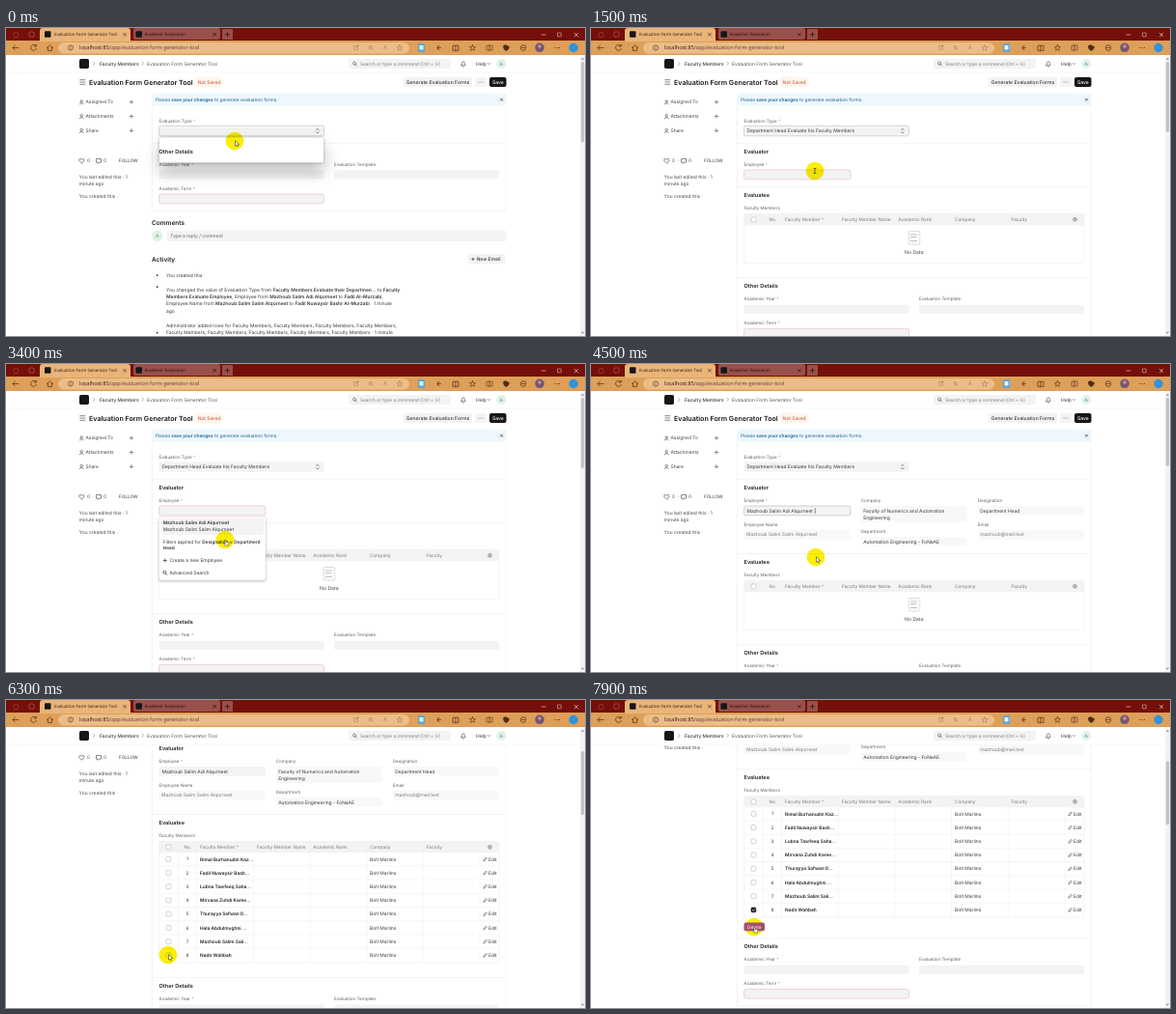
An HTML page for the animation above (8 s loop, 600x319 px).

```html
<!DOCTYPE html>
<html lang="en">
<head>
<meta charset="utf-8">
<title>Evaluation form</title>
<style>
html, body { margin: 0; width: 100%; height: 100%; overflow: hidden; background: #fff; }
svg { display: block; width: 600px; height: 319px; }
text { font-family: Inter, sans-serif; text-rendering: geometricPrecision; white-space: pre; }
.chrome text { font-family: "Open Sans", sans-serif; }
.floating { filter: drop-shadow(0 1px 1px rgba(0, 0, 0, .25)); }
.raised { filter: drop-shadow(0 0 1px rgba(0, 0, 0, .4)) drop-shadow(0 9px 8px rgba(0, 0, 0, .25)); }
</style>
</head>
<body>
<svg id="stage" viewBox="0 0 600 319" xmlns="http://www.w3.org/2000/svg"></svg>
<script>
const LOOP = 8000, STEP = 100;
const INK = '#383838', MUTED = '#7c7c7c', FILL = '#f3f3f3', LINE = '#ededed', RED = '#e8b9b9', STAR = '#e08585';
const stage = document.getElementById('stage');

const person = 'Mazhoub Salim Adi Alqurneet';
const fullName = 'Mazhoub Salim Salim Alqurneet';
const choice = 'Department Head Evaluate his Faculty Members';
const members = ['Rimal Burhanudin Kaz...', 'Fadil Nuwaysir Bash...', 'Lubna Tawfeeq Saha...',
  'Mirvana Zuhdi Karee...', 'Thurayya Safwan D...', 'Hala Abdulmughni ...',
  'Mazhoub Salim Sali...', 'Nadir Wahbah'];

// Drawing helpers; text is placed by its vertical middle.
const bold = s => `<tspan font-weight="600">${s}</tspan>`;
const text = (x, y, s, o = {}) => {
  const size = o.size || 4.9;
  return `<text x="${x}" y="${y + size * .36}" font-size="${size}" font-weight="${o.weight || 400}" ` +
    `fill="${o.fill || INK}" text-anchor="${o.anchor || 'start'}">${s}</text>`;
};
const rect = (x, y, w, h, fill, r = 0, stroke = 'none') =>
  `<rect x="${x}" y="${y}" width="${w}" height="${h}" rx="${r}" fill="${fill}" stroke="${stroke}" stroke-width=".6"/>`;
const circle = (x, y, r, fill, stroke = 'none') =>
  `<circle cx="${x}" cy="${y}" r="${r}" fill="${fill}" stroke="${stroke}" stroke-width=".7"/>`;
const path = (d, stroke = INK, width = .7, fill = 'none') =>
  `<path d="${d}" fill="${fill}" stroke="${stroke}" stroke-width="${width}" stroke-linecap="round" stroke-linejoin="round"/>`;
const group = (x, y, body) => `<g transform="translate(${x} ${y})">${body}</g>`;
const fade = (opacity, body) => `<g opacity="${opacity}">${body}</g>`;
const label = (x, y, s, required) =>
  text(x, y, s + (required ? ` <tspan fill="${STAR}">*</tspan>` : ''), { size: 4.55, fill: '#626262' });
const heading = (y, s) => text(158.5, y, s, { size: 5.6, weight: 600, fill: '#222' });
const rule = y => path(`M151.5 ${y}H518`, LINE, .6);
const plus = (x, y, c, r = 2) => path(`M${x - r} ${y}h${2 * r}M${x} ${y - r}v${2 * r}`, c, .65);
const cross = (x, y, c, r = 1.4) => path(`M${x - r} ${y - r}l${2 * r} ${2 * r}m0 ${-2 * r}l${-2 * r} ${2 * r}`, c, .7);
const lens = (x, y, c) => circle(x - .4, y - .4, 1.5, 'none', c) + path(`M${x + .8} ${y + .8}l1.3 1.3`, c);
const star = (x, y, c) => path(`M${x} ${y - 3}l.9 2 2.1.2-1.6 1.4.5 2.1-1.9-1.1-1.9 1.1.5-2.1-1.6-1.4 2.1-.2z`, c, .6);

function browser() {
  const c = '#4a2c17', pale = '#a8804f', light = '#e9c5b8', dark = '#260c09', bar = '#dd9f59', tab = '#97504c';
  let s = rect(0, 0, 600, 14, '#740f09') + rect(0, 13, 600, 15, bar);
  s += path('M35 14V3q0-3 3-3H126q3 0 3 3V14z', 'none', 0, '#e9b478');
  s += rect(132, 0, 90, 12, tab, 2) + rect(224, 1, 11, 11, tab, 1);
  s += rect(8, 4.5, 4.5, 5, 'none', 1, '#b44840') + rect(24, 4, 5, 5, 'none', 1, '#c4685c');
  s += rect(40, 3.3, 6.5, 6.5, '#171717', 1) + rect(134.5, 3.3, 6.5, 6.5, '#171717', 1);
  s += text(50, 6.5, 'Evaluation Form Generator Tool', { size: 4.4, fill: '#2b1712' });
  s += text(143.5, 6.5, 'Academic Evaluation', { size: 4.4, fill: dark });
  s += cross(123, 6.7, c) + cross(216, 6.7, dark) + plus(229.5, 6.7, dark);
  s += path('M555 7h4', light) + rect(571.5, 5, 3.8, 3.8, 'none', .4, light) + cross(591, 7, light, 1.8);
  s += path('M13 20.5H7m2.4-2.5L7 20.5 9.4 23', c);
  s += path('M31 18.6a3 3 0 1 0 .4 2.8M31.2 17v2h-2', c);
  s += path('M42.5 20.5l3-2.7 3 2.7M43.4 20v3.4h4.2V20', c);
  s += rect(54, 15, 364, 11.5, '#ebbd88', 5.7);
  s += circle(67, 20.5, 2.6, 'none', '#5f4129') + path('M67 20.2v1.5m0-2.8v.1', '#5f4129', .6);
  s += text(76, 20.4, 'localhost:85<tspan fill="#5f4129">/app/evaluation-form-generator-tool</tspan>', { size: 5.5, fill: '#2a1a14' });
  s += rect(360.5, 18.3, 4, 4.2, 'none', .6, pale) + path('M363 20l2.6-2.6', pale) + lens(378, 20.3, pale);
  s += text(391, 20.3, 'A', { size: 5.8, fill: pale }) + star(408, 20.5, pale);
  s += rect(427, 16.3, 7, 8.4, '#4ba7e6', 1.5) + rect(428.5, 18, 4, 4.6, '#e8f4fc', .4);
  s += path('M449 18.5q-2 0-2 2t2 2m-1.5-2h3', c);
  s += path('M466 18.5v5q-2-1-3 0v-5q2-1 3 0q1-1 3 0v5q-1-1-3 0', c);
  s += star(483.5, 20.5, c) + rect(498, 18, 6, 5, 'none', 1, c) + path('M501 18v5', c);
  s += path('M518.5 18q-3.5-1-3 2t3 3.6q2.7-1.3 2.9-3.8z', c, .7, c) + circle(536, 20.5, 2.8, 'none', c) + path('M534.5 20.5h3', c);
  s += circle(553, 20.3, 4.8, '#755878') + circle(553, 19, 1.7, '#c59a87');
  s += [569, 571.2, 573.4].map(x => circle(x, 20.5, .6, c)).join('') + circle(588, 20.5, 4.7, '#2f93dc');
  return `<g class="chrome">${s}</g>`;
}

function navbar() {
  const chevron = x => path(`M${x} 35.2l1.6 1.7-1.6 1.7`, '#888', .6);
  return rect(0, 28, 595, 18, '#fff') + path('M0 46H595', '#f1f1f1', .6) + rect(76, 32, 10, 10, '#171717', 1.7) +
    chevron(90.5) + text(97, 37, 'Faculty Members', { size: 4.9, weight: 500 }) +
    chevron(141) + text(146, 37, 'Evaluation Form Generator Tool', { fill: '#555' }) +
    rect(355, 32, 106, 10, FILL, 2) + lens(361.5, 37, '#555') +
    text(367, 37, 'Search or type a command (Ctrl + G)', { size: 4.75, fill: MUTED }) +
    path('M471.8 38.8h4.4q-.7-.8-.7-2.2 0-1.8-1.5-1.8t-1.5 1.8q0 1.4-.7 2.2zM473.5 40h1', '#444', .6) +
    text(487, 37, 'Help', { size: 5 }) + path('M499.3 36.4l1.3 1.3 1.3-1.3', '#555', .6) +
    circle(513.3, 37, 5, '#dff3e6') + text(513.3, 37, 'A', { anchor: 'middle', fill: '#3a9a63' });
}

function pageHead() {
  let s = [53.7, 56, 58.3].map(y => path(`M76.8 ${y}h5`, '#444', .65)).join('');
  s += text(86, 56, 'Evaluation Form Generator Tool', { size: 7.1, weight: 600, fill: '#171717' });
  s += rect(196, 51, 29, 10, '#fff3ee', 4) + text(198.8, 56, 'Not Saved', { size: 4.85, fill: '#cb4f25' });
  s += rect(412, 51, 71, 10, FILL, 2) + text(447.5, 56, 'Generate Evaluation Forms', { size: 5.1, weight: 500, anchor: 'middle' });
  s += rect(486, 51, 12, 10, FILL, 2) + [490, 492, 494].map(x => circle(x, 56, .45, INK)).join('');
  s += rect(501, 51, 17.5, 10, '#171717', 2) + text(509.8, 56, 'Save', { size: 5, weight: 500, fill: '#fff', anchor: 'middle' });
  ['Assigned To', 'Attachments', 'Share'].forEach((name, i) => {
    const y = [76.7, 91.5, 106.3][i];
    s += circle(78.3, y - .8, 1.2, 'none', '#555') + path(`M76.2 ${y + 2}q2.1-2.6 4.2 0`, '#555');
    s += text(82.5, y, name, { size: 4.9, fill: '#444' }) + plus(130, y, '#555', 1.8);
  });
  s += path('M78.4 140l-2.4-2.4q-.8-1.8.8-2.2 1-.1 1.6 1 .6-1.1 1.6-1 1.6.4.8 2.2z', '#555');
  s += text(84, 137.5, '0  ·', { fill: '#555' }) + path('M94 135.4h4.5v3.8h-2.2l-1.2 1.1v-1.1H94z', '#555') + text(101, 137.5, '0', { fill: '#555' });
  s += text(117, 137.5, 'FOLLOW', { size: 4.7 });
  s += text(75.8, 154.7, 'You last edited this · 1', { fill: '#4a4a4a' }) + text(75.8, 161.7, 'minute ago', { fill: '#4a4a4a' });
  s += text(75.8, 174, 'You created this ·', { fill: '#4a4a4a' });
  s += rect(151.5, 68, 367, 12.5, '#edf7fd', 2);
  s += text(155, 74.2, `Please ${bold('save your changes')} to generate evaluation forms.`, { size: 4.75, fill: '#1f6591' });
  return s + cross(513.5, 74.2, '#333', 1.2);
}

function typeSection(st) {
  return label(158.5, 96, 'Evaluation Type', true) +
    rect(158.5, 101.2, 171, 10.6, FILL, 2, st.selectFocus ? '#bdbdbd' : 'none') +
    text(161.5, 106.5, st.chosen ? choice : '') +
    path('M321.7 105.5l1.2-1.3 1.2 1.3m0 2.2l-1.2 1.3-1.2-1.3', '#444', .6);
}

function evaluator(st) {
  let s = rule(119.3) + heading(127.7, 'Evaluator') + label(158.5, 141, 'Employee', true);
  const edge = st.filled ? (st.fieldFocus ? '#b5b5b5' : 'none') : RED;
  s += rect(158.5, 147, 110.5, 9.8, FILL, 2, edge);
  if (st.filled) s += text(161.5, 152, person);
  if (st.caret) s += path(`M${st.filled ? 232.3 : 161.6} 149.5v5`, '#222', .5);
  if (!st.fetched) return s;
  const value = (x, y, h, lines, fill = INK) => rect(x, y - 4.8, 110, h, '#f8f8f8', 2) +
    lines.map((line, i) => text(x + 2.5, y + i * 7.4, line, { fill })).join('');
  return s + label(158.5, 166.5, 'Employee Name') + value(158.5, 176.6, 9.6, [fullName], MUTED) +
    label(279.7, 141, 'Company') + value(279.7, 151.8, 17, ['Faculty of Numerics and Automation', 'Engineering']) +
    label(279.7, 173.2, 'Department') + value(279.7, 183.8, 9.6, ['Automation Engineering - FoNaAE']) +
    label(400.8, 141, 'Designation') + value(400.8, 151.8, 9.6, ['Department Head']) +
    label(400.8, 166.5, 'Email') + value(400.8, 176.6, 9.6, ['mazhoub@mail.test'], MUTED);
}

const checkbox = (y, on) => rect(166, y - 2.4, 4.9, 4.9, on ? '#171717' : '#fff', 1.1, on ? '#171717' : '#b5b5b5') +
  (on ? path(`M167.3 ${y}l1 1.1 1.6-2`, '#fff', .7) : '');

const PITCH = 14.22, TABLE_END = 39.8 + members.length * PITCH;

// Placed relative to the top edge of the section.
function evaluatee(st) {
  const bottom = st.rows ? TABLE_END : 79;
  const columns = [[201, `Faculty Member <tspan fill="${STAR}">*</tspan>`], [259.7, 'Faculty Member Name'],
    [318.3, 'Academic Rank'], [377, 'Company'], [435.5, 'Faculty']];
  let s = rule(0) + heading(8.7, 'Evaluatee') + label(158.5, 22, 'Faculty Members');
  s += rect(158.5, 28, 352.5, bottom - 28, '#fff', 2, LINE) + rect(158.5, 28, 352.5, 11.8, FILL, 2);
  s += checkbox(33.8) + text(184.5, 33.8, 'No.', { size: 4.7, fill: MUTED });
  s += columns.map(([x, name]) => text(x, 33.8, name, { size: 4.75, fill: MUTED })).join('');
  s += circle(501.5, 33.8, 1.9, 'none', '#777') + circle(501.5, 33.8, .7, 'none', '#777');
  if (!st.rows) {
    return s + rect(329.2, 46, 11.6, 13.6, '#fafafa', 1, '#c9c9c9') +
      path('M331.5 49.5h2m1 0h3m-6 2.5h2m1 0h2m-5 4h6', '#999', .6) +
      text(334.8, 67.8, 'No Data', { size: 5.1, fill: '#444', anchor: 'middle' });
  }
  s += [178.5, 197.5, 256.5, 315, 373.7, 432.3, 491].map(x => path(`M${x} 28V${bottom}`, LINE, .5)).join('');
  members.forEach((name, i) => {
    const y = 46.3 + i * PITCH;
    if (i) s += path(`M158.5 ${y - PITCH / 2}H511`, LINE, .5);
    s += checkbox(y, st.checked && i === members.length - 1);
    s += text(188, y, i + 1, { size: 4.7, anchor: 'middle' });
    s += text(201, y, name, { size: 4.8, weight: 600, fill: '#222' }) + text(377, y, 'Bolt Marlins', { size: 4.9 });
    s += path(`M495 ${y + 1.6}l.4-1.4 2-2 1 1-2 2z`, '#444', .6) + text(500, y, 'Edit', { size: 4.8 });
  });
  return s;
}

const deleteButton = hover => rect(158.5, TABLE_END + 5.4, 21.5, 8.8, hover ? '#a3506a' : '#c0483f', 2) +
  text(169.2, TABLE_END + 9.8, 'Delete', { size: 4.8, fill: '#fff', anchor: 'middle' });

// Everything from "Other Details" down, relative to its heading.
function lowerPart() {
  let s = rule(-8.3) + heading(0, 'Other Details') + label(158.5, 13.5, 'Academic Year', true) + rect(158.5, 19.7, 171, 9.3, FILL, 2);
  s += label(340, 13.5, 'Evaluation Template') + rect(340, 19.7, 171, 9.3, FILL, 2);
  s += label(158.5, 38.6, 'Academic Term', true) + rect(158.5, 44.4, 171, 9.6, FILL, 2, RED) + rule(61.8);
  s += text(151, 74, 'Comments', { size: 6.5, weight: 600, fill: '#222' });
  s += circle(156.8, 87.8, 5.7, '#dff3e6') + text(156.8, 87.8, 'A', { anchor: 'middle', fill: '#3a9a63' });
  s += rect(167, 82.2, 351.5, 11.2, FILL, 2) + text(170.3, 87.8, 'Type a reply / comment', { fill: '#666' });
  s += text(151, 112, 'Activity', { size: 6.5, weight: 600, fill: '#222' });
  s += rect(479, 106.5, 38.5, 10.5, FILL, 2) + plus(484, 111.8, '#333', 1.3) + text(487.5, 111.8, 'New Email', { size: 5, weight: 500 });
  s += [128.5, 140.5, 188].map(y => circle(156.7, y, .9, '#222')).join('');
  const many = n => Array(n).fill('Faculty Members').join(', ');
  return s + [
    [128.4, 'You created this ·'],
    [143.4, `You changed the value of Evaluation Type from ${bold('Faculty Members Evaluate their Departmen...')} to ${bold('Faculty')}`],
    [150.7, `${bold('Members Evaluate Employee')}, Employee from ${bold(person)} to ${bold('Fadil Al-Murzabi')},`],
    [158, `Employee Name from ${bold(fullName)} to ${bold('Fadil Nuwaysir Bashr Al-Murzabi')} · 1 minute`],
    [165.3, 'ago'],
    [180.4, `Administrator added rows for ${many(4)},`],
    [187.7, `${many(5)} · 1 minute`]
  ].map(([y, line]) => text(166, y, line, { size: 4.9 })).join('');
}

// The list opens blank, with the heading beneath still visible.
function typePopup(t) {
  const shown = Math.min(1, t / 300);
  const options = [choice, 'Faculty Members Evaluate Employee', 'Faculty Members Evaluate their Department Head'];
  return `<g class="raised">${rect(158.7, 113.2, 170.5, 26.3, '#fff', 1.5)}</g>` +
    fade(1 - shown, heading(127.6, 'Other Details')) +
    fade(shown, rect(159, 114, 169.5, 8.2, '#e6e6e6', 1) + options.map((s, i) => text(161.5, 118.2 + i * 8.2, s)).join(''));
}

function employeePopup() {
  return `<g class="floating">${rect(158.5, 158.5, 110.5, 65.5, '#fff', 2, '#e2e2e2')}</g>` +
    rect(160.5, 160, 106.5, 17, FILL, 2) + text(162.7, 164.3, person, { size: 4.8, weight: 600 }) + text(162.7, 171, fullName) +
    text(162.7, 184, `Filters applied for ${bold('Designation = Department')}`, { size: 4.75 }) +
    text(162.7, 190.7, bold('Head'), { size: 4.75 }) +
    plus(164.8, 203.5, '#222', 1.6) + text(169.5, 203.5, 'Create a new Employee') +
    lens(164.8, 216.2, '#222') + text(169.5, 216.2, 'Advanced Search');
}

const ease = k => k * k * (3 - 2 * k);
function track(keys, t) {
  const i = keys.findIndex(k => k[0] > t);
  if (i < 0) return keys[keys.length - 1].slice(1);
  const a = keys[i - 1], b = keys[i], k = ease((t - a[0]) / (b[0] - a[0]));
  return a.slice(1).map((v, n) => v + (b[n + 1] - v) * k);
}

const route = [[0, 237, 117], [600, 237, 117], [1400, 232, 148], [1500, 232, 148], [1900, 231, 151],
  [2800, 231, 151], [3100, 228, 258], [3400, 227, 182], [3600, 222, 168], [3700, 222, 168], [4500, 233, 200],
  [4700, 233, 200], [5000, 231, 193], [5300, 231, 192], [5600, 238, 82], [5900, 200, 235], [6100, 172, 274],
  [6300, 168, 264], [6600, 170, 266], [7400, 170, 266], [7900, 169, 235]];
const scrolling = [[0, 0], [4600, 0], [5000, 78], [6800, 78], [7000, 124], [7200, 125]];

const highlight = ([x, y]) => `<circle cx="${x}" cy="${y}" r="9.3" fill="#fbee08" style="mix-blend-mode:multiply"/>`;

function pointer([x, y], t) {
  const hand = (t >= 3300 && t < 3900) || t >= 7700;
  const beam = t >= 1300 && t < 2900;
  const shape = hand
    ? path('M0 0q.8-.6 1.1.2v2l2.4.6q.6.3.4 1.2l-.5 2H.3L-1.4 3.7q0-.8.9-.4L0 4z', '#222', .5, '#fff')
    : beam ? path('M-1-2.5h2M0-2.5v5M-1 2.5h2', '#222', .6)
    : path('M.5 0v5.2l1.3-1.1.9 1.9.8-.4-.8-1.8 1.6-.1z', '#222', .5, '#fff');
  return group(x, y, shape);
}

function scrollbar(scroll, height) {
  const view = 291, room = 277, size = room * view / height;
  return rect(595, 28, 5, 291, '#f3f3f3') + rect(595.8, 35 + room * scroll / height, 3.4, size, '#c3c3c3', 1.5) +
    path('M596.5 32.5l1-1.4 1 1.4zM596.5 315l1 1.4 1-1.4z', '#777', .3, '#777');
}

function render(t) {
  const st = {
    selectFocus: t < 1600,
    chosen: t >= 700,
    expanded: t >= 900,
    filled: t >= 3700,
    fetched: t >= 4100,
    fieldFocus: t < 6300,
    caret: (t >= 1800 && t < 2300) || (t >= 2800 && t < 3300) || (t >= 4100 && t < 4700),
    rows: t >= 4900,
    checked: t >= 6400,
    hover: t >= 7700
  };
  const [scroll] = track(scrolling, t), spot = track(route, t);
  const listTop = st.fetched ? 196.5 : 164.5;
  const lower = !st.expanded ? 127.6 : listTop + (!st.rows ? 102.5 : st.checked ? 183.6 : 177.2);
  let page = pageHead() + path(`M151.5 80V${lower + 61.8}M518 80V${lower + 61.8}`, LINE, .6) + typeSection(st);
  if (st.expanded) page += evaluator(st) + group(0, listTop, evaluatee(st));
  page += group(0, lower, lowerPart());
  if (t < 700) page += typePopup(t);
  if (t >= 2900 && t < 3700) page += employeePopup();
  stage.innerHTML = rect(0, 0, 600, 319, '#fff') + group(0, -scroll, page) + navbar() +
    scrollbar(scroll, 842 + lower) + browser() + highlight(spot) +
    (st.checked ? group(0, listTop - scroll, deleteButton(st.hover)) : '') + pointer(spot, t);
}

function tick(now) {
  render(Math.floor(now % LOOP / STEP) * STEP);
  requestAnimationFrame(tick);
}
render(0);
requestAnimationFrame(tick);
</script>
</body>
</html>
```
